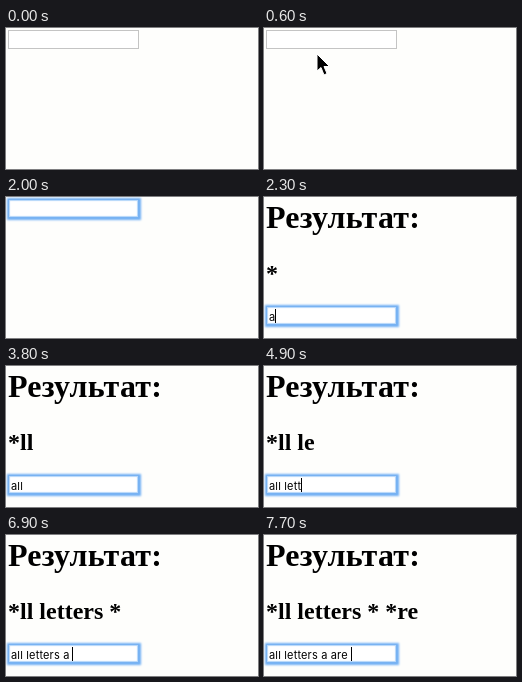
These frames come from a looping animation (252 by 141 pixels, 8 s). An HTML page:

```html
<!DOCTYPE html>
<html lang="ru">
<head>
<meta charset="utf-8">
<title>Результат</title>
<style>
  html, body { margin: 0; width: 100%; height: 100%; overflow: hidden; background: #fefefc; color: #000; }
  h1, h2 { position: absolute; left: 2px; margin: 0; white-space: pre; font-family: "Liberation Serif", serif; font-weight: bold; }
  h1 { top: 2px; font-size: 32px; line-height: 37px; letter-spacing: 0.2px; }
  h2 { top: 62px; font-size: 24px; line-height: 28px; }
  #field { position: absolute; left: 2px; width: 131px; height: 19px; box-sizing: border-box; border: 1px solid #c4c4c4; background: #fff; }
  #field.focus { border-color: #78b2f2; box-shadow: 0 0.5px 2px 1.5px #70aff4, inset 0 0 1px 1px #b4d6fa; }
  #typed { position: absolute; left: 2px; top: 3px; font: 11px/14px Inter, sans-serif; letter-spacing: 0.16px; white-space: pre; }
  #caret { position: absolute; top: 2px; width: 1px; height: 14px; background: #000; }
  svg { position: absolute; left: 0; top: 0; width: 252px; height: 141px; }
  .halo { stroke: #fff; stroke-width: 3.4; }
  [hidden] { display: none !important; }
</style>
</head>
<body>
<h1 id="title">Результат:</h1>
<h2 id="result"></h2>
<div id="field"><span id="typed"></span><i id="caret"></i></div>
<svg>
  <defs>
    <path id="beamPath" d="M-4.5-10Q-1-10 0-7Q1-10 4.5-10M0-7V7M-4.5 10Q-1 10 0 7Q1 10 4.5 10M-2.5 0H2.5"/>
  </defs>
  <g id="beam" fill="none" stroke="#000" stroke-width="1.8">
    <use href="#beamPath" class="halo"/><use href="#beamPath"/>
  </g>
  <path id="arrow" d="M1 1V18L5 14.5L8 22L11 20.5L8 13.5H13.5Z" stroke="#fff"/>
</svg>
<script>
const LOOP = 8000, TICK = 100;
const ENTER = 400, FOCUS = 1000, HIDE = 2000, FIRST_KEY = 2300;
const RESULT_LAG = 200, BLINK = 650, BLINK_ON = 350;

// Typing comes in bursts: text, start time, time per key.
const BURSTS = [
  ['a', FIRST_KEY, 0], ['ll ', 3000, 200], ['letters', 4500, 117],
  [' a', 5550, 50], [' ', 6200, 0], ['are ', 7200, 150]
];
const KEYS = BURSTS.flatMap(([text, start, step]) =>
  [...text].map((char, i) => ({ char, time: start + i * step })));

const $ = id => document.getElementById(id);
const pressed = t => KEYS.filter(key => key.time <= t);
const textOf = keys => keys.map(key => key.char).join('');
const progress = (t, start, length) => Math.min(1, Math.max(0, (t - start) / length));

function drawText(t) {
  const keys = pressed(t);
  const lastEvent = keys.length ? keys.at(-1).time : FOCUS;
  const hasResult = t >= FIRST_KEY;

  $('title').hidden = $('result').hidden = !hasResult;
  $('result').textContent = textOf(pressed(Math.max(FIRST_KEY, t - RESULT_LAG))).replaceAll('a', '*');
  $('field').style.top = hasResult ? '109px' : '2px';
  $('field').className = t >= FOCUS ? 'focus' : '';
  $('typed').textContent = textOf(keys);
  $('caret').hidden = t < FOCUS || (t - lastEvent) % BLINK >= BLINK_ON;
  $('caret').style.left = 2 + Math.floor($('typed').getBoundingClientRect().width + 0.2) + 'px';
}

// The pointer dips below the field, rests, then returns to click in it.
function drawPointer(t) {
  const away = progress(t, ENTER, 200), back = progress(t, 800, 200);
  const x = 107 - 55 * away + 16.5 * back;
  const y = 12 + 13 * away - 11 * back;
  const visible = t >= ENTER && t < HIDE;
  const overField = y < 21;

  $('beam').style.display = visible && overField ? '' : 'none';
  $('arrow').style.display = visible && !overField ? '' : 'none';
  for (const id of ['beam', 'arrow']) $(id).setAttribute('transform', `translate(${x} ${y})`);
}

function frame() {
  const now = performance.now() % LOOP;
  const t = now - now % TICK;
  drawText(t);
  drawPointer(t);
  requestAnimationFrame(frame);
}
frame();
</script>
</body>
</html>
```
